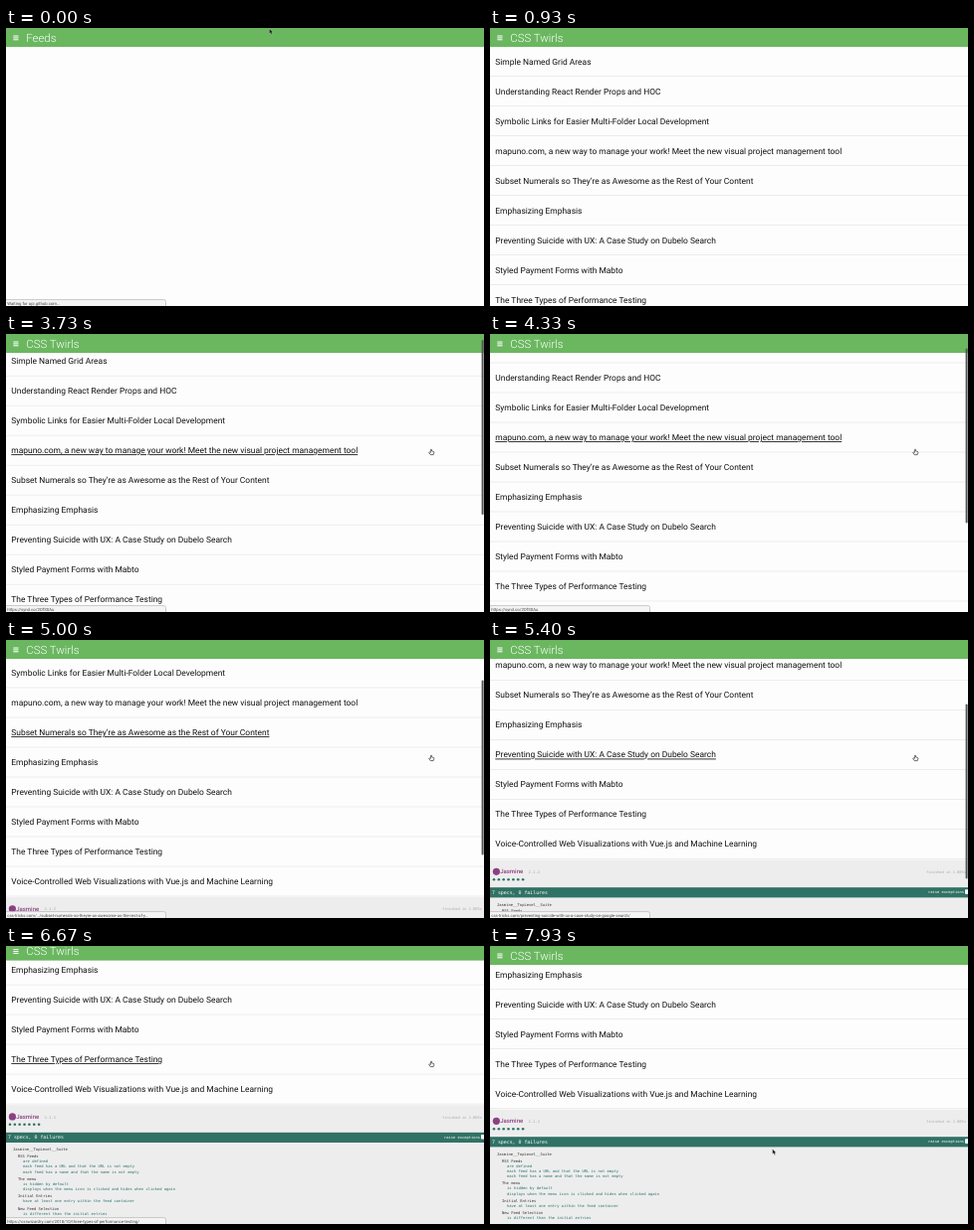
Recreate the animation shown at these times as an HTML page. Size 480 px wide and 280 px high, loop 8000 ms.

```html
<!DOCTYPE html>
<html lang="en">
<head>
<meta charset="utf-8">
<title>Feed reader</title>
<style>
  html, body { margin: 0; width: 100%; height: 100%; overflow: hidden; background: #fefdfe; }
  svg { display: block; width: 480px; height: 280px; text-rendering: geometricPrecision; }
  text { font-family: Roboto, sans-serif; white-space: pre; }
  .row { font-size: 8.43px; fill: #111; }
  .hover { text-decoration: underline; }
  .divider { fill: #e9e9e9; }
  .mono { font: 3.8px "DejaVu Sans Mono", monospace; fill: #333; }
  .pass { fill: #2a7468; }
  .light { fill: #fff; }
  .dim { fill: #aaa; }
  #title { font-size: 11.4px; font-weight: 300; fill: #fff; }
  #url { font-size: 4.25px; fill: #444; }
</style>
</head>
<body>
<svg viewBox="0 0 480 280">
  <rect width="480" height="280" fill="#fefdfe"/>
  <g id="page"></g>
  <g id="header">
    <rect y="-1" width="480" height="20" fill="#6ab760"/>
    <path d="M7.3 8h5.2M7.3 9.9h5.2M7.3 11.8h5.2" stroke="#fff"/>
    <text id="title" x="20.3" y="13.8"></text>
  </g>
  <rect id="thumb" x="477.6" width="2" height="176" rx="1" fill="#555"/>
  <g id="status">
    <path d="M-1 281V273.6H158.5Q160.5 273.6 160.5 275.6V281Z" fill="#f5f5f5" stroke="#bdbdbd" stroke-width=".8"/>
    <text id="url" x="1.2" y="278.6"></text>
  </g>
  <path id="arrow" d="M0 0V5L1.2 4L2 5.8L2.9 5.4L2.1 3.7H3.6Z" fill="#111" stroke="#fff" stroke-width=".25"/>
  <path id="hand" d="M-.6 .4Q0 -.4 .6 .4V2L2.6 2.5Q3 2.8 2.8 3.8L2.2 5.6H-.8L-2.3 3.4Q-2.2 2.6 -.6 3.4Z"
        fill="#fff" stroke="#333" stroke-width=".7"/>
</svg>
<script>
const SVG = "http://www.w3.org/2000/svg";
const $ = id => document.getElementById(id);
const page = $("page");

function add(tag, attrs, text = "") {
  const el = document.createElementNS(SVG, tag);
  for (const key in attrs) el.setAttribute(key, attrs[key]);
  el.textContent = text;
  return page.appendChild(el);
}
const mono = (x, y, text, cls = "", size = 3.8, anchor = "start") =>
  add("text", { x, y, class: "mono " + cls, style: `font-size:${size}px`, "text-anchor": anchor }, text);

// Feed entries
const ROW = 30, TOP = 18.5, MAX_SCROLL = 155;
const rows = [
  "Simple Named Grid Areas",
  "Understanding React Render Props and HOC",
  "Symbolic Links for Easier Multi-Folder Local Development",
  "mapuno.com, a new way to manage your work! Meet the new visual project management tool",
  "Subset Numerals so They’re as Awesome as the Rest of Your Content",
  "Emphasizing Emphasis",
  "Preventing Suicide with UX: A Case Study on Dubelo Search",
  "Styled Payment Forms with Mabto",
  "The Three Types of Performance Testing",
  "Voice-Controlled Web Visualizations with Vue.js and Machine Learning"
].map((text, i) => {
  add("rect", { y: TOP + ROW * (i + 1) - .4, width: 480, height: .8, class: "divider" });
  return add("text", { x: 5.3, y: TOP + ROW * i + 18, class: "row" }, text);
});

// Test report below the entries
add("rect", { y: 319.6, width: 480, height: 200, fill: "#eeedee" });
add("circle", { cx: 6.4, cy: 331.3, r: 3.6, fill: "#8a4182" });
add("text", { x: 10.2, y: 333.4, fill: "#8a4182", style: "font-size:6px;font-weight:500" }, "Jasmine");
mono(38.5, 333, "2.1.2", "dim");
mono(478, 333, "finished in 1.005s", "dim", 3.7, "end");
for (let i = 0; i < 7; i++) add("circle", { cx: 4 + i * 4.85, cy: 339.2, r: 1.3, class: "pass" });
add("rect", { y: 347.2, width: 480, height: 10.2, fill: "#30725f" }).style.fill = "#307265";
mono(2, 353.8, "7 specs, 0 failures", "light", 4.9);
mono(476, 353.4, "raise exceptions", "light", 3.75, "end");
add("rect", { x: 477, y: 349.3, width: 4, height: 4.6, rx: .8, class: "light" });

mono(7, 365.7, "Jasmine__TopLevel__Suite");
const suites = [
  [372.5, "RSS Feeds", "are defined", "each feed has a URL and that the URL is not empty",
    "each feed has a name and that the name is not empty"],
  [395.2, "The menu", "is hidden by default", "displays when the menu icon is clicked and hides when clicked again"],
  [412.7, "Initial Entries", "have at least one entry within the feed container"],
  [425, "New Feed Selection", "is different than the initial entries"]
];
for (const [y, name, ...specs] of suites) {
  mono(12, y, name);
  specs.forEach((spec, i) => mono(17, y + 5.2 * (i + 1), spec, "pass"));
}

// Motion
const scrollKeys = [[3600, 0], [3730, 6.3], [3930, 12], [4130, 12], [4670, 36], [4870, 36],
  [5000, 60.5], [5300, 95], [5400, 98], [5700, MAX_SCROLL]];
const bounceKeys = [[5820, 0], [6250, 9], [6450, 8], [6670, 4.4], [7000, 0]];
const xKeys = [[70, 264.5], [350, 272], [1800, 304], [2270, 323], [2470, 349], [2730, 349], [3200, 427],
  [6900, 427], [7330, 330], [7530, 330], [7900, 283.7]];
const yKeys = [[70, .8], [350, -8], [1750, -8], [1800, 5], [2270, 93], [2470, 101], [2730, 101], [3200, 116],
  [6900, 116], [7330, 214], [7530, 214], [7900, 204.6]];

// [start, hovered row]
const hovers = [[0, -1], [1890, 0], [2040, 1], [2200, 2], [3000, 3], [4450, 4], [5330, 6], [6300, 8], [7050, 9], [7140, -1]];
// [start, status text]
const statuses = [
  [0, "Waiting for api.github.com..."],
  [530, ""],
  [2400, "https://css-tricks.com/symbolic-links-for-easier-multi-folder-local-d…"],
  [3080, "https://synd.co/2OfS0Au"],
  [4500, "css-tricks.com/…/subset-numerals-so-theyre-as-awesome-as-the-rest-of-y…"],
  [5400, "css-tricks.com/preventing-suicide-with-ux-a-case-study-on-google-search/"],
  [6350, "https://csswizardry.com/2018/10/three-types-of-performance-testing/"],
  [7600, ""]
];

function ease(t, keys) {
  const i = keys.findIndex(key => key[0] > t);
  if (i === 0) return keys[0][1];
  if (i < 0) return keys[keys.length - 1][1];
  const [t0, a] = keys[i - 1], [t1, b] = keys[i];
  const p = (t - t0) / (t1 - t0);
  return a + (b - a) * p * p * (3 - 2 * p);
}
const step = (t, list) => list.filter(item => item[0] <= t).pop()[1];
const move = (el, x, y) => el.setAttribute("transform", `translate(${x} ${y})`);
const show = (el, visible) => el.style.visibility = visible ? "visible" : "hidden";

function draw(t) {
  const scroll = ease(t, scrollKeys), bounce = ease(t, bounceKeys);
  const loaded = t >= 930, hovered = step(t, hovers), status = step(t, statuses);

  show(page, loaded);
  move(page, 0, -scroll - bounce);
  move($("header"), 0, -bounce);
  $("title").textContent = loaded ? "CSS Twirls" : "Feeds";
  rows.forEach((row, i) => row.classList.toggle("hover", i === hovered));

  move($("thumb"), 0, 2 + scroll * .637);
  $("thumb").style.opacity = t < 3600 ? 0 : ease(t, [[6330, 1], [6600, 0]]);

  show($("status"), status);
  $("url").textContent = status;

  const x = ease(t, xKeys), y = ease(t, yKeys);
  for (const id of ["arrow", "hand"]) {
    move($(id), x, y);
    show($(id), (id === "hand") === (hovered >= 0));
  }
}

function loop() {
  draw(performance.now() % 8000);
  requestAnimationFrame(loop);
}
loop();
</script>
</body>
</html>
```
